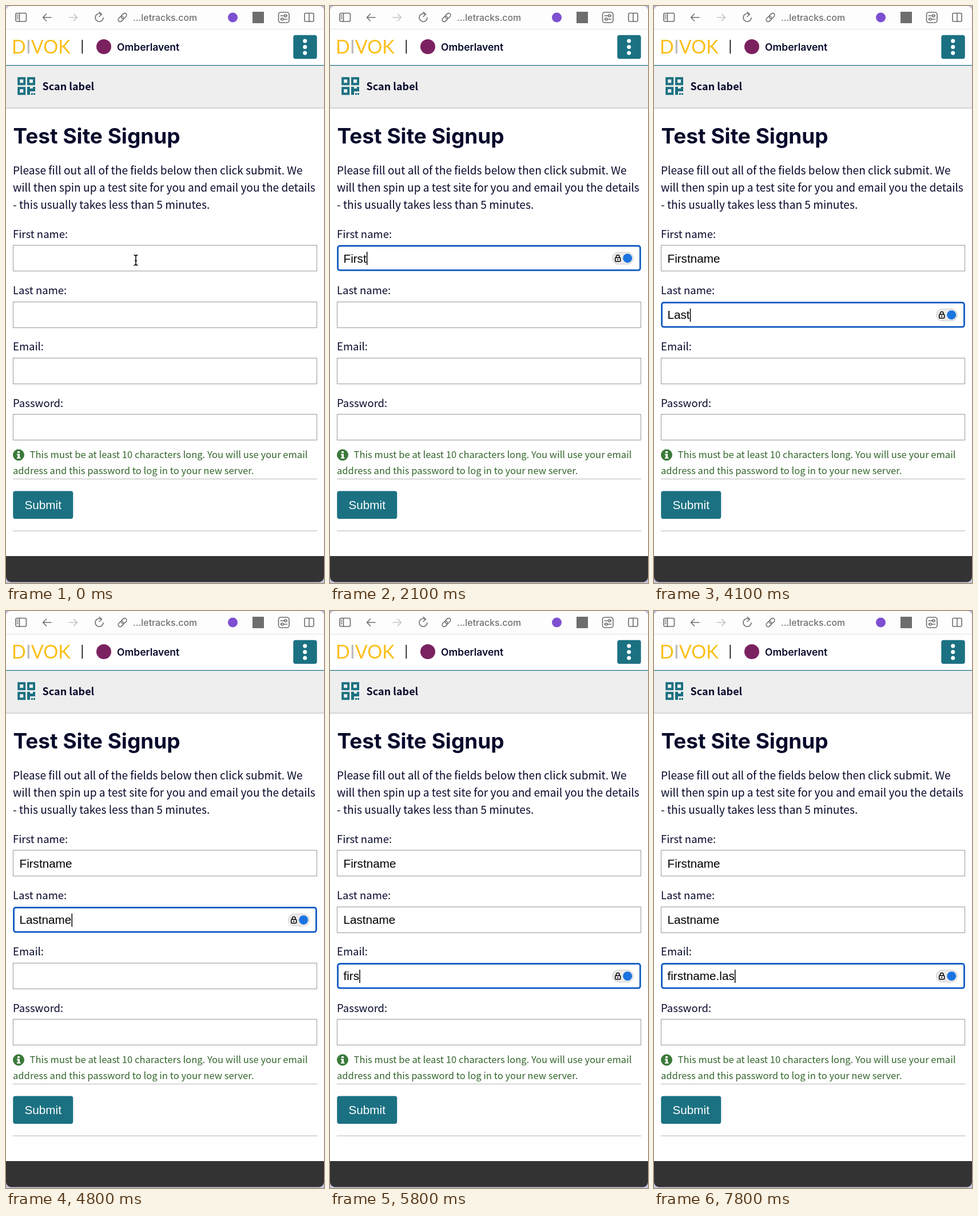
Animation of 556x1007 px, one loop 8000 ms. Source, as an HTML page:

```html
<!DOCTYPE html>
<html lang="en">
<head>
<meta charset="utf-8">
<title>Signup form</title>
<style>
  html, body { margin: 0; width: 100%; height: 100%; overflow: hidden; background: #c3c3e2; }
  svg { display: block; width: 100vw; height: 100vh; }
  text { white-space: pre; fill: #06092b; }
  .body { font: 19.12px "Noto Sans CJK JP", "Noto Sans CJK SC", "Noto Sans CJK", "Noto Sans", sans-serif; }
  .label { font-size: 18.55px; }
  .bold { font-size: 18px; font-weight: 700; }
  .help { font-size: 16.58px; fill: #34672d; }
  .heading { font: 700 37px Inter, sans-serif; }
  .product { font: 600 17.5px Inter, sans-serif; }
  .address { font: 500 15.8px Inter, sans-serif; fill: #717171; }
  .brand { font: 32.5px Lato, sans-serif; fill: #fcbf16; }
  .input { font: 20.7px "Liberation Sans", Arial, sans-serif; fill: #000; }
  .icon { fill: none; stroke: #6c6c6c; stroke-width: 1.6; stroke-linecap: round; stroke-linejoin: round; }
</style>
</head>
<body>
<svg viewBox="0 0 556 1007" preserveAspectRatio="none">
  <clipPath id="window"><rect width="556" height="1005.5" rx="9"/></clipPath>
  <g clip-path="url(#window)">
    <rect width="556" height="1007" fill="#fff"/>
    <rect width="556" height="40" fill="#fdfdfd"/>
    <rect y="40" width="556" height="1" fill="#e2e2e2"/>
    <rect y="103" width="556" height="1.5" fill="#1b7182"/>
    <rect y="104.5" width="556" height="73" fill="#eee"/>
    <rect y="176.5" width="556" height="3" fill="#dcdcdc"/>
    <rect y="960" width="556" height="47" fill="#333"/>
  </g>

  <!-- Browser toolbar -->
  <g class="icon">
    <rect x="17" y="12.5" width="18.5" height="14.5" rx="2.5"/>
    <path d="M23.5 12.5V27M19.5 16h1.5M19.5 19h1.5M19.5 22h1.5"/>
    <path d="M79 20H64.5M70.5 14L64.5 20L70.5 26"/>
    <path d="M110 20H124.5M118.5 14L124.5 20L118.5 26" stroke="#c4c4c4"/>
    <path d="M167 14.5A7 7 0 1 0 170 20.5M163 10.5L167.5 14.5L163 18.5"/>
    <g transform="rotate(-45 203.5 20)" stroke-width="1.5">
      <rect x="194.5" y="16.5" width="10.5" height="7" rx="3.5"/>
      <rect x="202" y="16.5" width="10.5" height="7" rx="3.5"/>
    </g>
    <rect x="476.5" y="11" width="18.5" height="18" rx="4"/>
    <path d="M480 17h6.5M490.5 17h1M480 23h1M485 23h6.5"/>
    <circle cx="488.5" cy="17" r="2"/>
    <circle cx="483" cy="23" r="2"/>
    <rect x="522" y="12.5" width="16" height="14.5" rx="2"/>
    <path d="M530 12.5V27"/>
  </g>
  <text class="address" x="222" y="26">...letracks.com</text>
  <circle cx="396.5" cy="20" r="8.5" fill="#7d4fd1"/>
  <rect x="431" y="10" width="20" height="20" fill="#6d6d6d"/>

  <!-- Site header -->
  <text class="brand" x="10" y="83">D<tspan fill="#b9b9b9">I</tspan>VOK</text>
  <rect x="132.5" y="59" width="1.7" height="24" fill="#111"/>
  <circle cx="171" cy="71" r="13" fill="#7b2160"/>
  <text class="product" x="194" y="77.5">Omberlavent</text>
  <rect x="502.3" y="50.8" width="41.4" height="41.4" rx="4" fill="#1b7182"/>
  <g fill="#fff">
    <circle cx="522.7" cy="61" r="3.5"/>
    <circle cx="522.7" cy="71.5" r="3.5"/>
    <circle cx="522.7" cy="82" r="3.5"/>
  </g>
  <g fill="none" stroke="#1b7182" stroke-width="4">
    <rect x="22.2" y="126.2" width="10" height="10"/>
    <rect x="39" y="126.2" width="10" height="10"/>
    <rect x="22.2" y="143.2" width="10" height="10"/>
  </g>
  <path d="M37 141h5v3h5v-3h4v8h-9v6h-5zM44 152h3v3h-3zM48 152h3v3h-3z" fill="#1b7182"/>
  <text class="body bold" x="63.5" y="146.5">Scan label</text>

  <!-- Page content -->
  <text class="heading" x="12.5" y="240">Test Site Signup</text>
  <g class="body">
    <text x="12" y="294">Please fill out all of the fields below then click submit. We</text>
    <text x="12" y="324">will then spin up a test site for you and email you the details</text>
    <text x="12" y="354">- this usually takes less than 5 minutes.</text>
  </g>
  <g id="fields"></g>
  <circle cx="22" cy="783.5" r="10" fill="#3b7a3a"/>
  <path d="M20 777h4v3.2h-4zM19 781.8h5v6h1.5v2h-6.5v-2h1.5v-4h-1.5z" fill="#fff"/>
  <text class="body help" x="41.5" y="789">This must be at least 10 characters long. You will use your email</text>
  <text class="body help" x="12" y="816.5">address and this password to log in to your new server.</text>
  <path d="M12 825.5H544M12 916H544" stroke="#ccc" stroke-width="1.3"/>
  <rect x="12.3" y="846.4" width="105" height="48.6" rx="4" fill="#1b7182"/>
  <text class="input" x="32.5" y="877.5" style="fill:#fff">Submit</text>

  <!-- Focus decorations, placed relative to the top of the active field -->
  <g id="focus">
    <rect x="13.6" y="1.6" width="528.8" height="42.6" rx="3.5" fill="none" stroke="#0a56c0" stroke-width="2.7"/>
    <rect id="caret" y="12" width="1.5" height="23" fill="#000"/>
    <g id="badge">
      <rect x="-18.5" y="-10.5" width="37" height="21" rx="10.5" fill="#e9e9e9" stroke="#cfcfcf"/>
      <g fill="none" stroke="#000" stroke-width="1.5">
        <rect x="-13.3" y="-1" width="9" height="6.5" rx="1"/>
        <path d="M-11.6 -1V-3a2.8 2.8 0 0 1 5.6 0V-1M-8.8 1v2.5"/>
      </g>
      <circle cx="8.2" r="8" fill="#1a74e0"/>
    </g>
  </g>
  <path id="pointer" d="M223.5 434.5q3.5 0 3.5 2.5v13q0 2.5-3.5 2.5M230.5 434.5q-3.5 0-3.5 2.5v13q0 2.5 3.5 2.5M225 444.5h4"
    fill="none" stroke="#000" stroke-width="1.5"/>
</svg>

<script>
const LOOP = 8000, TICK = 100, FIRST_TOP = 417.3, FIELD_GAP = 98.2;
const $ = id => document.getElementById(id);
const clamp = v => Math.max(0, Math.min(1, v));

// Focus time and one keystroke time per character, in ticks
const fields = [
  { label: 'First name:', value: 'Firstname', focus: 1, keys: [16, 18, 19, 20, 21, 23, 24, 25, 27] },
  { label: 'Last name:', value: 'Lastname', focus: 30, keys: [34, 36, 38, 40, 43, 45, 46, 48] },
  { label: 'Email:', value: 'firstname.las', focus: 50, keys: [53, 55, 56, 58, 60, 64, 65, 66, 68, 70, 74, 76, 78] },
  { label: 'Password:', value: '', focus: Infinity, keys: [] }
];

function add(tag, attrs, content = '') {
  const node = document.createElementNS('http://www.w3.org/2000/svg', tag);
  for (const name in attrs) node.setAttribute(name, attrs[name]);
  node.textContent = content;
  return $('fields').appendChild(node);
}

fields.forEach((field, i) => {
  const top = FIRST_TOP + i * FIELD_GAP;
  field.top = Math.round(top);
  add('text', { class: 'body label', x: 12, y: Math.round(top - 12.3) }, field.label);
  field.box = add('rect', { x: 12.5, y: field.top + .5, width: 531, height: 45, fill: '#fff', stroke: '#999' });
  field.text = add('text', { class: 'input', x: 23.5, y: top + 30.2 });
});

// The caret blinks softly only until the first keystroke
function caretOpacity(tick) {
  if (tick < 6 || tick >= 12) return 1;
  return clamp(Math.abs(tick - 9) / 3);
}

function draw(now) {
  const tick = Math.floor(now % LOOP / TICK);
  for (const field of fields) {
    field.text.textContent = field.value.slice(0, field.keys.filter(k => k <= tick).length);
    field.box.style.visibility = 'visible';
  }
  const active = fields.filter(f => f.focus <= tick).pop();
  $('focus').style.display = active ? '' : 'none';
  $('pointer').style.display = tick < fields[0].keys[0] ? '' : 'none';
  if (active) {
    active.box.style.visibility = 'hidden';
    $('focus').setAttribute('transform', `translate(0 ${active.top})`);
    $('caret').setAttribute('x', 23.7 + active.text.getComputedTextLength());
    $('caret').style.opacity = caretOpacity(tick);
    const shown = clamp((tick - active.focus + .15) / 3);
    $('badge').setAttribute('transform', `translate(512 23.2) scale(${.5 + shown / 2})`);
    $('badge').style.opacity = shown;
  }
}

const start = performance.now();
(function frame() {
  draw(performance.now() - start);
  requestAnimationFrame(frame);
})();
</script>
</body>
</html>
```
